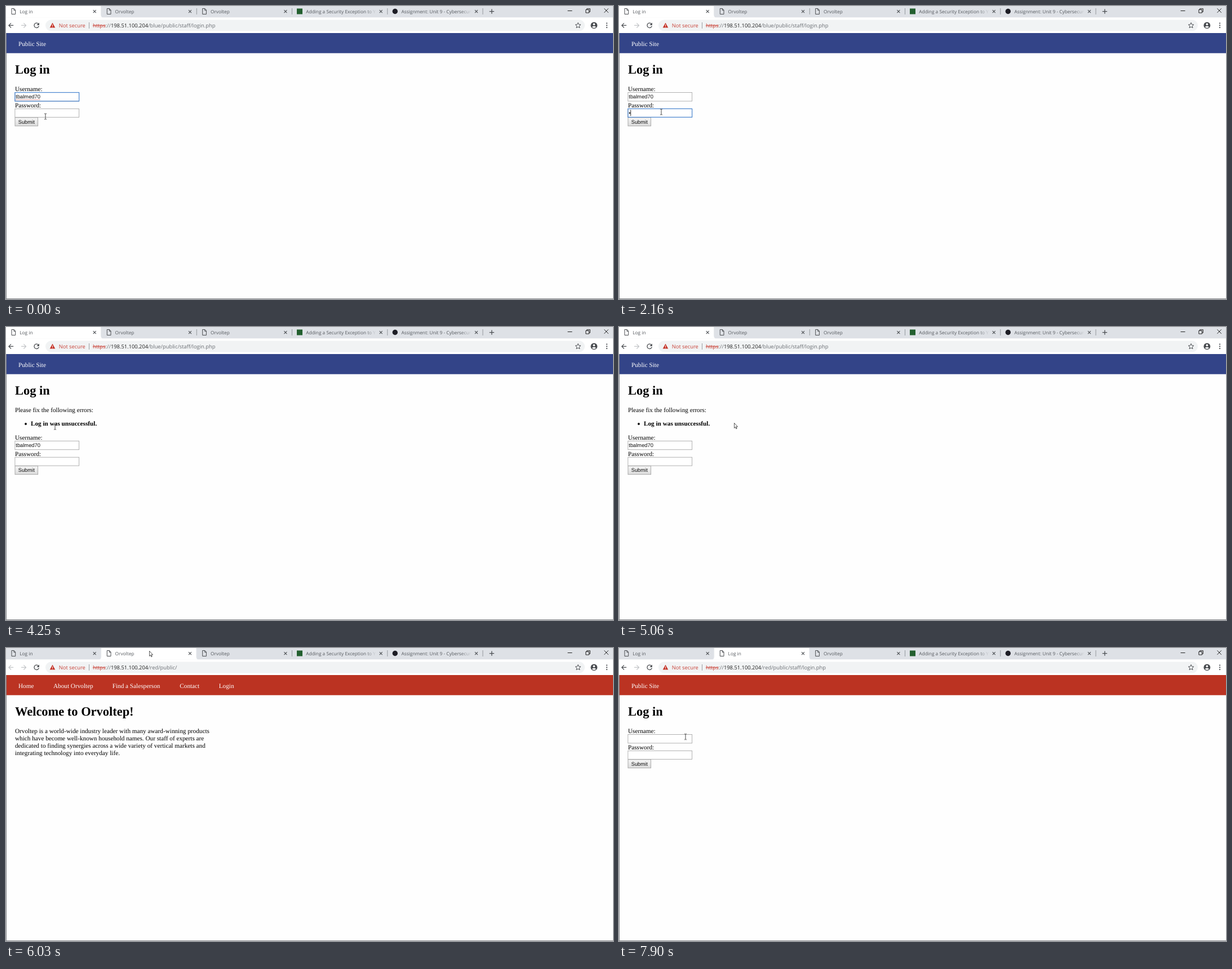
An HTML page that plays this animation: 1077x520 px, repeating every 8000 ms.

```html
<!DOCTYPE html>
<html lang="en">
<head>
<meta charset="utf-8">
<title>Login walkthrough</title>
<style>
html, body { margin: 0; width: 100%; height: 100%; overflow: hidden; background: #fefefe; }
svg { display: block; }
text { text-rendering: geometricPrecision; white-space: pre; }
.ui { font-family: "Open Sans", "Noto Sans", sans-serif; font-size: 8.3px; fill: #55595e; }
.bar { font-family: "Open Sans", "Noto Sans", sans-serif; font-size: 9.35px; fill: #6b6f74; }
.doc { font-family: "Liberation Serif", "Times New Roman", serif; font-size: 11.22px; fill: #000; }
.h1 { font-size: 22.44px; font-weight: bold; }
.nav { fill: #fff; }
.field { font-family: "Liberation Sans", Arial, sans-serif; font-size: 9.35px; fill: #111; }
.line { fill: none; stroke: #4a4d51; stroke-width: 1.1; }
.box { fill: #fff; stroke: #a9a9a9; stroke-width: .9; }
.focus { fill: none; stroke: #4a86d0; stroke-width: 1.2; }

/* Every change is a hard step on one shared 8 s clock. */
.k { animation: 8s step-end infinite; }
.userFocus { animation-name: userFocus; }
.passFocus { animation-name: passFocus; }
.plain { animation-name: plain; }
.errors { animation-name: errors; }
.loading { animation-name: loading; }
.idle { animation-name: idle; }
.blue { animation-name: blue; }
.red { animation-name: red; }
.home { animation-name: home; }
.homeUrl { animation-name: homeUrl; }
.redLogin { animation-name: redLogin; }
.redLoginUrl { animation-name: redLoginUrl; }
.hover { animation-name: hover; }
.tip { animation-name: tip; }
.oldTitle { animation-name: oldTitle; }
.back { animation-name: back; }
.typed { animation-name: typed; }
.blink { animation-name: blink; }
.move { animation-name: move; }
.beam { animation-name: beam; }
.arrow { animation-name: arrow; }
.hand { animation-name: hand; }

@keyframes userFocus { 0% { opacity: 1 } 7.625%, 100% { opacity: 0 } }
@keyframes passFocus { 0% { opacity: 0 } 7.625% { opacity: 1 } 43.875%, 100% { opacity: 0 } }
@keyframes plain { 0% { opacity: 1 } 43.875%, 100% { opacity: 0 } }
@keyframes errors { 0% { opacity: 0 } 43.875% { opacity: 1 } 75.375%, 100% { opacity: 0 } }
@keyframes loading { 0% { opacity: 0 } 42.25% { opacity: 1 } 43.875%, 100% { opacity: 0 } }
@keyframes idle { 0% { opacity: 1 } 42.25% { opacity: 0 } 43.875%, 100% { opacity: 1 } }
@keyframes blue { 0% { opacity: 1 } 75.375%, 100% { opacity: 0 } }
@keyframes red { 0% { opacity: 0 } 75.375%, 100% { opacity: 1 } }
@keyframes home { 0% { opacity: 0 } 75.375% { opacity: 1 } 95.375%, 100% { opacity: 0 } }
@keyframes homeUrl { 0% { opacity: 0 } 75.375% { opacity: 1 } 93.75%, 100% { opacity: 0 } }
@keyframes redLogin { 0% { opacity: 0 } 95.375%, 100% { opacity: 1 } }
@keyframes redLoginUrl { 0% { opacity: 0 } 93.75%, 100% { opacity: 1 } }
@keyframes hover { 0% { opacity: 0 } 70.125% { opacity: 1 } 75.375%, 100% { opacity: 0 } }
@keyframes tip { 0% { opacity: 0 } 73.5% { opacity: 1 } 75.375%, 100% { opacity: 0 } }
@keyframes oldTitle { 0% { opacity: 1 } 93.75%, 100% { opacity: 0 } }
@keyframes back { 0% { stroke: #4a4d51 } 75.375% { stroke: #c3c5c8 } 93.75%, 100% { stroke: #4a4d51 } }
@keyframes blink { 0% { opacity: 0 } 7.625% { opacity: 1 } 14.625% { opacity: 0 } 21.5% { opacity: 1 } 43.875%, 100% { opacity: 0 } }
@keyframes typed {
  0% { transform: translateX(0) }
  27% { transform: translateX(3.27px) }
  28.625% { transform: translateX(6.54px) }
  30.25% { transform: translateX(9.81px) }
  34.125% { transform: translateX(13.08px) }
  35.75% { transform: translateX(16.35px) }
  37.375% { transform: translateX(19.62px) }
  39% { transform: translateX(22.89px) }
  40.625%, 100% { transform: translateX(26.16px) }
}
@keyframes move {
  0% { transform: translate(70px, 196px) }
  1.875% { transform: translate(71px, 194px) }
  3.75% { transform: translate(73px, 191px) }
  5.625% { transform: translate(75px, 188px) }
  47.375% { transform: translate(76px, 187px) }
  49.125% { transform: translate(79px, 184px) }
  51% { transform: translate(83px, 180px) }
  53.125% { transform: translate(87px, 177px) }
  54.75% { transform: translate(112px, 179px) }
  56.375% { transform: translate(152px, 186px) }
  58.125% { transform: translate(194px, 195px) }
  59.75% { transform: translate(209px, 182px) }
  61.625% { transform: translate(204px, 170px) }
  63.375% { transform: translate(194px, 148px) }
  65% { transform: translate(190px, 112px) }
  66.625% { transform: translate(200px, 70px) }
  68.375% { transform: translate(222px, 34px) }
  70.125% { transform: translate(240px, 13px) }
  71.75% { transform: translate(252px, 7px) }
  73.5% { transform: translate(254px, 5px) }
  77.125% { transform: translate(258px, 13px) }
  78.875% { transform: translate(285px, 29px) }
  80.75% { transform: translate(325px, 47px) }
  82.5% { transform: translate(365px, 58px) }
  84.25% { transform: translate(394px, 64px) }
  86.125% { transform: translate(401px, 66px) }
  92% { transform: translate(300px, 108px) }
  93.75% { transform: translate(202px, 166px) }
  95.375% { transform: translate(150px, 164px) }
  97%, 100% { transform: translate(118px, 157.5px) }
}
@keyframes beam { 0% { opacity: 1 } 56.375% { opacity: 0 } 97%, 100% { opacity: 1 } }
@keyframes arrow { 0% { opacity: 0 } 56.375% { opacity: 1 } 84.25% { opacity: 0 } 92% { opacity: 1 } 97%, 100% { opacity: 0 } }
@keyframes hand { 0% { opacity: 0 } 84.25% { opacity: 1 } 92%, 100% { opacity: 0 } }
</style>
</head>
<body>
<svg width="1077" height="520" viewBox="0 0 1077 520">
  <defs>
    <linearGradient id="fade" gradientUnits="userSpaceOnUse" x1="130" y1="0" x2="149" y2="0">
      <stop stop-color="#55595e"/><stop offset="1" stop-color="#55595e" stop-opacity="0"/>
    </linearGradient>
    <radialGradient id="glow" gradientUnits="userSpaceOnUse" cx="85" cy="6" r="60">
      <stop stop-color="#f2f3f5"/><stop offset="1" stop-color="#e4e6ea"/>
    </radialGradient>
    <linearGradient id="button" x2="0" y2="1">
      <stop stop-color="#f6f6f6"/><stop offset="1" stop-color="#dcdcdc"/>
    </linearGradient>
    <path id="page" class="line" style="stroke-width:1" d="M10 4.5h4.2l2.5 2.7v7.3H10zM14 4.5v3h2.7"/>
    <path id="close" class="line" d="M154.7 7.1l5 5m0-5l-5 5"/>
    <path id="active" fill="#fff" d="M-4 20.5Q-.5 20 -.5 15V0H168.3V15Q168.3 20 172 20.5Z"/>
    <g id="form">
      <text class="doc" x="16" y="151">Username:</text>
      <rect class="box" x="15.9" y="153.5" width="113.7" height="15.4"/>
      <text class="doc" x="16" y="180">Password:</text>
      <rect class="box" x="15.9" y="182.4" width="113.7" height="15"/>
      <rect x="16" y="197.9" width="40.6" height="15" fill="url(#button)" stroke="#a2a2a2" stroke-width=".9"/>
      <text class="field" x="21.7" y="208.6">Submit</text>
    </g>
    <g id="loginHead">
      <text class="doc nav" x="22" y="70.5">Public Site</text>
      <text class="doc h1" x="16" y="120">Log in</text>
    </g>
  </defs>

  <rect width="1077" height="520" fill="#fefefe"/>

  <!-- Tab strip -->
  <rect width="1077" height="20.5" fill="#dee1e6"/>
  <path d="M507.5 4v11M676.8 4v11M846 4v11" stroke="#8d9196" stroke-width=".9"/>
  <path class="k blue" d="M338.3 4v11" stroke="#8d9196" stroke-width=".9"/>
  <use class="k blue" href="#active"/>
  <g transform="translate(169.3)">
    <path class="k hover" fill="url(#glow)" d="M-.5 20.5V0H168.3V20.5Z"/>
    <use class="k red" href="#active"/>
  </g>
  <g class="ui">
    <use class="k idle" href="#page"/>
    <path class="k loading line" stroke-linecap="round" d="M13 5.4a4 4 0 1 0 4 4"/>
    <text x="24.3" y="12.7">Log in</text>
    <use href="#close"/>
    <g transform="translate(169.3)">
      <use href="#page"/><use href="#close"/>
      <text class="k oldTitle" x="24.3" y="12.7">Orvoltep</text>
      <text class="k redLoginUrl" x="24.3" y="12.7">Log in</text>
    </g>
    <g transform="translate(338.7)">
      <use href="#page"/><use href="#close"/>
      <text x="24.3" y="12.7">Orvoltep</text>
    </g>
    <g transform="translate(508)">
      <rect x="8" y="4.5" width="10" height="10" fill="#23602f"/><use href="#close"/>
      <text x="24.3" y="12.7" fill="url(#fade)">Adding a Security Exception to Y</text>
    </g>
    <g transform="translate(677.3)">
      <circle cx="13" cy="9.5" r="4.7" fill="#1d1d25"/><use href="#close"/>
      <text x="24.3" y="12.7" fill="url(#fade)">Assignment: Unit 9 - Cybersecuri</text>
    </g>
  </g>
  <path class="line" style="stroke-width:1.3" d="M857.7 9.6h8.4m-4.2-4.2v8.4"/>
  <path class="line" style="stroke:#222;stroke-width:1" d="M996.5 8.5h8M1061.4 4.4l7.4 7.4m0-7.4l-7.4 7.4M1028.8 6.5h5.6v5.6h-5.6zM1030.6 6.3V4.7h5.7v5.6h-1.7"/>

  <!-- Toolbar -->
  <rect y="20.5" width="1077" height="27.5" fill="#fff"/>
  <rect x="70" y="24.5" width="957" height="20" rx="10" fill="#f1f3f4"/>
  <path class="k back line" style="stroke-width:1.2" d="M13.2 34.4H5M9 30.3l-4.1 4.1 4.1 4.1"/>
  <path class="line" style="stroke:#c3c5c8;stroke-width:1.2" d="M27 34.4h8.4M31.4 30.3l4.1 4.1-4.1 4.1"/>
  <path class="line" style="stroke-width:1.3" d="M57.4 31.7a4.2 4.2 0 1 0 .9 3.6"/>
  <path fill="#4a4d51" d="M58.9 29.6v4.5h-4.5z"/>
  <path fill="#c5362b" d="M82.5 29.8l4.8 8.6h-9.6z"/>
  <path stroke="#fff" stroke-width="1" d="M82.5 32.8v2.8m0 .8v1"/>
  <text class="bar" x="93.7" y="37.9" style="fill:#c9443a">Not secure</text>
  <path d="M147.5 29v11" stroke="#9a9da1" stroke-width="1"/>
  <text class="bar" x="154" y="37.9"><tspan fill="#c9443a">https</tspan>://<tspan fill="#222">198.51.100.204</tspan><tspan class="k blue">/</tspan></text>
  <path d="M153.8 34.9h23" stroke="#c9443a" stroke-width=".9"/>
  <!-- Whole addresses: one is shown over a cleared stretch of the bar -->
  <rect x="152" y="26" width="240" height="17" fill="#f1f3f4"/>
  <g class="bar">
    <text class="k blue" x="154" y="37.9"><tspan fill="#c9443a">https</tspan>://<tspan fill="#222">198.51.100.204</tspan>/blue/public/staff/login.php</text>
    <text class="k homeUrl" x="154" y="37.9"><tspan fill="#c9443a">https</tspan>://<tspan fill="#222">198.51.100.204</tspan>/red/public/</text>
    <text class="k redLoginUrl" x="154" y="37.9"><tspan fill="#c9443a">https</tspan>://<tspan fill="#222">198.51.100.204</tspan>/red/public/staff/login.php</text>
  </g>
  <path d="M153.8 34.9h23" stroke="#c9443a" stroke-width=".9"/>
  <path class="line" style="stroke-width:1" d="M1015 29.6l1.4 3.2 3.4.3-2.6 2.3.8 3.4-3-1.8-3 1.8.8-3.4-2.6-2.3 3.4-.3z"/>
  <circle cx="1043.3" cy="34.4" r="5.9" fill="#4a4d51"/>
  <circle cx="1043.3" cy="32.4" r="1.8" fill="#fff"/>
  <path fill="#fff" d="M1039.6 37.3q3.7-3.4 7.4 0q-3.7 3.4-7.4 0z"/>
  <g fill="#4a4d51"><circle cx="1066" cy="30.6" r="1.1"/><circle cx="1066" cy="34.4" r="1.1"/><circle cx="1066" cy="38.2" r="1.1"/></g>

  <!-- Blue site -->
  <g class="k blue">
    <rect y="48" width="1077" height="35.7" fill="#348"/>
    <use href="#loginHead"/>
    <g class="k plain">
      <use href="#form"/>
      <text class="field" x="17.3" y="164.3">tbalmed70</text>
      <g class="k userFocus">
        <path fill="none" stroke="#e04040" stroke-width=".8" stroke-dasharray="1.4 .8" d="M17.3 166.2H61"/>
        <rect class="focus" x="15.9" y="153.5" width="113.7" height="15.4"/>
      </g>
      <text class="field" x="17.3" y="193">••••••••</text>
      <g class="k typed">
        <rect x="17" y="184" width="40" height="12" fill="#fff"/>
        <path class="k blink" d="M17.4 184.3v10.8" stroke="#000" stroke-width=".9"/>
      </g>
      <rect class="k passFocus focus" x="15.9" y="182.4" width="113.7" height="15"/>
    </g>
    <g class="k errors">
      <text class="doc" x="16" y="151">Please fix the following errors:</text>
      <circle cx="35" cy="172" r="1.9"/>
      <text class="doc" x="44" y="175.3" font-weight="bold">Log in was unsuccessful.</text>
      <use href="#form" y="48.8"/>
      <text class="field" x="17.3" y="213.1">tbalmed70</text>
    </g>
  </g>

  <!-- Red site -->
  <g class="k red">
    <rect y="48" width="1077" height="35.7" fill="#b32"/>
    <g class="k home">
      <g class="doc nav" style="fill:#fff">
        <text x="22" y="70.5">Home</text>
        <text x="84" y="70.5">About Orvoltep</text>
        <text x="188.7" y="70.5">Find a Salesperson</text>
        <text x="308.3" y="70.5">Contact</text>
        <text x="377.7" y="70.5">Login</text>
      </g>
      <text class="doc h1" x="16" y="120">Welcome to Orvoltep!</text>
      <g class="doc">
        <text x="16" y="151">Orvoltep is a world-wide industry leader with many award-winning products</text>
        <text x="16" y="164">which have become well-known household names. Our staff of experts are</text>
        <text x="16" y="177.1">dedicated to finding synergies across a wide variety of vertical markets and</text>
        <text x="16" y="190.2">integrating technology into everyday life.</text>
      </g>
    </g>
    <g class="k redLogin"><use href="#loginHead"/><use href="#form"/></g>
  </g>

  <path d="M.5 48V520M0 519.5H1077" stroke="#85878a" stroke-width="1"/>

  <g class="k tip">
    <rect x="253.9" y="16" width="39.3" height="13.6" fill="#fcfcfc" stroke="#bdbdbd" stroke-width=".9"/>
    <text class="ui" x="257" y="25.7" style="fill:#a0a0a0">Orvoltep</text>
  </g>

  <!-- Pointer -->
  <g class="k move">
    <path class="k beam" fill="none" stroke="#333" stroke-width=".9" d="M-2-5H-.5L0-4.5L.5-5H2M0-4.5V4.5M-2 5H-.5L0 4.5L.5 5H2"/>
    <path class="k arrow" fill="#fff" stroke="#222" stroke-width=".8" stroke-linejoin="round" d="M.4.4V9.4L2.4 7.5L3.8 10.7L5.2 10.1L3.8 7H6.5Z"/>
    <path class="k hand" fill="#fff" stroke="#222" stroke-width=".8" stroke-linejoin="round" d="M-.8 6V.8Q0-.4.8.8V4.2L5 5Q6 5.4 5.8 7L5 11H0L-3 7.2Q-3-.0-.8 7Z"/>
  </g>
</svg>
</body>
</html>
```
